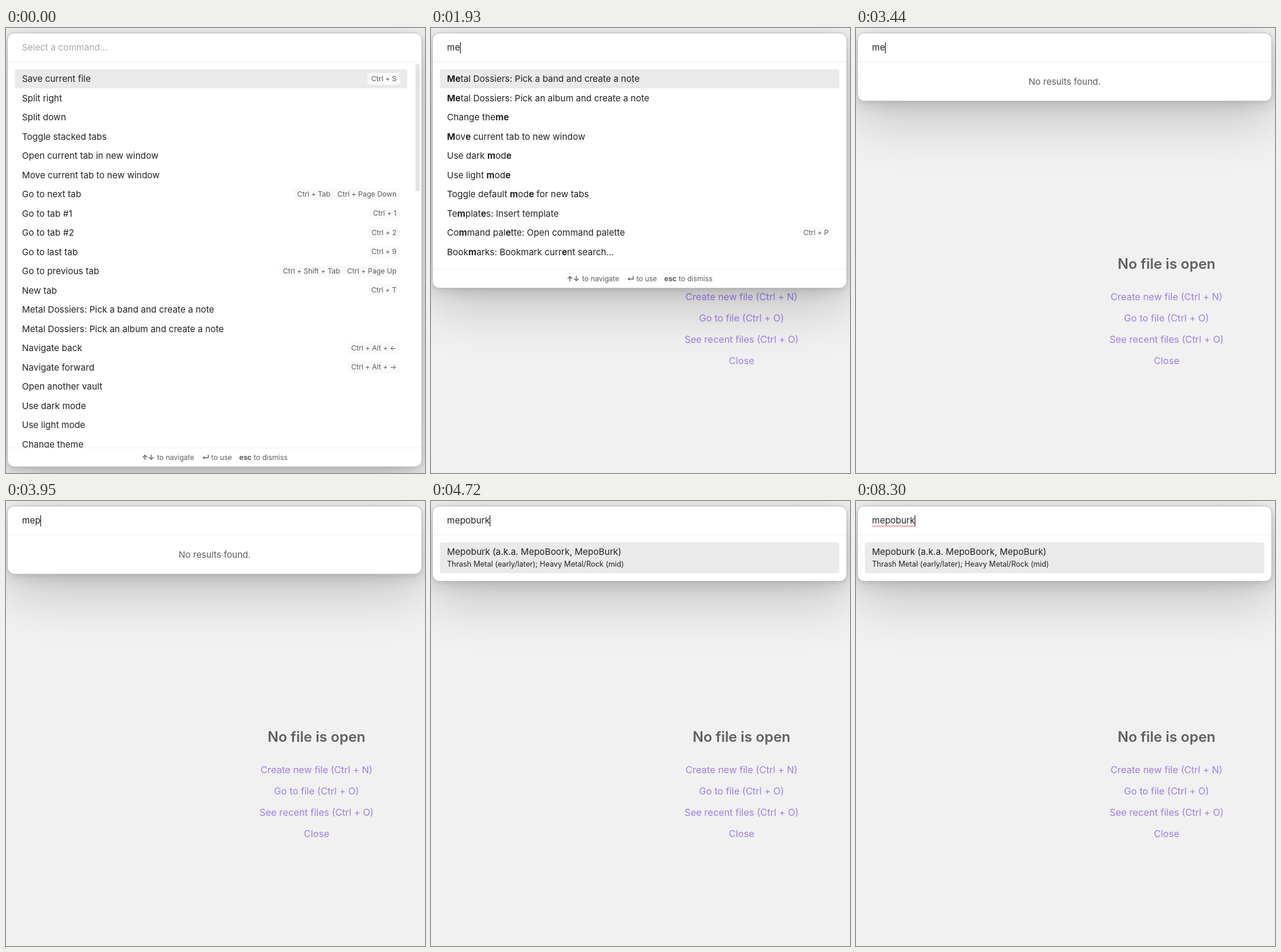
These frames come from a looping animation (707x752 px, 8660 ms). An HTML page:

```html
<!DOCTYPE html>
<html lang="en">
<head>
<meta charset="utf-8">
<title>Command palette</title>
<style>
* { box-sizing: border-box; }
html, body { margin: 0; width: 100%; height: 100%; overflow: hidden; }
body { position: relative; background: #f1f1f1; color: #222; font: 15px/19.5px Inter, sans-serif; }
#empty { position: absolute; left: 374px; top: 384px; width: 300px; text-align: center; color: #9f7ee8; font-size: 16px; line-height: 36px; }
#empty h1 { margin: 0 0 22px; font-size: 24px; font-weight: 600; line-height: 30px; color: #5f5f5f; }
#panel {
  position: absolute; left: 2px; top: 8px; width: 700px; max-height: 734px;
  display: flex; flex-direction: column; overflow: hidden;
  background: #fff; border: 1px solid #bdbdbd; border-radius: 12px;
  box-shadow: 0 1.8px 7.3px rgba(0,0,0,.07), 0 6.3px 24.7px rgba(0,0,0,.11), 0 30px 90px rgba(0,0,0,.2);
}
#input { flex: none; height: 49px; padding-left: 24px; display: flex; align-items: center; border-bottom: 1px solid #f0f0f0; }
#caret { width: 1px; height: 19px; margin: 0 -1px 0 0; background: #000; }
#hint { color: #ababab; }
#wave { position: absolute; left: 24px; top: 32px; width: 72px; height: 3px; fill: none; stroke: #e5303c; }
#results { padding: 12px; overflow: hidden; }
#results.scroll { padding-right: 24px; }
#thumb { position: absolute; left: 688px; top: 52px; width: 7px; border-radius: 3px; background: #e4e4e4; }
.row { display: flex; align-items: center; padding: 6px 12px; margin-bottom: 1px; border-radius: 3px; white-space: nowrap; }
.row:first-child { background: #eaeaea; }
.row > div { flex: 1; }
kbd { margin: -2px 0; padding: 2px 6px; border-radius: 4px; background: #fafafa; color: #5c5c5c; font: 12px/16px Inter, sans-serif; }
.none { height: 41px; line-height: 42px; text-align: center; color: #5c5c5c; }
#footer { position: relative; flex: none; height: 32px; border-top: 1px solid #f0f0f0; font-size: 12px; line-height: 31px; color: #5c5c5c; white-space: nowrap; }
#footer > * { position: absolute; top: 0; }
</style>
</head>
<body>
<div id="empty">
  <h1>No file is open</h1>
  <div>Create new file (Ctrl + N)</div>
  <div>Go to file (Ctrl + O)</div>
  <div>See recent files (Ctrl + O)</div>
  <div>Close</div>
</div>
<div id="panel">
  <div id="input"><span id="query"></span><i id="caret"></i><span id="hint">Select a command...</span></div>
  <svg id="wave"><path/></svg>
  <div id="results"></div>
  <div id="thumb"></div>
  <div id="footer">
    <b style="left:226px">↑↓</b><span style="left:252px">to navigate</span>
    <b style="left:328px">↵</b><span style="left:343.5px">to use</span>
    <b style="left:390.5px">esc</b><span style="left:415px">to dismiss</span>
  </div>
</div>
<script>
const LOOP = 8660;
const el = id => document.getElementById(id);

// Each entry: label | hotkey | hotkey
const commands = `Save current file|Ctrl + S
Split right
Split down
Toggle stacked tabs
Open current tab in new window
Move current tab to new window
Go to next tab|Ctrl + Tab|Ctrl + Page Down
Go to tab #1|Ctrl + 1
Go to tab #2|Ctrl + 2
Go to last tab|Ctrl + 9
Go to previous tab|Ctrl + Shift + Tab|Ctrl + Page Up
New tab|Ctrl + T
Metal Dossiers: Pick a band and create a note
Metal Dossiers: Pick an album and create a note
Navigate back|Ctrl + Alt + ←
Navigate forward|Ctrl + Alt + →
Open another vault
Use dark mode
Use light mode
Change theme`.split('\n');

const searchable = `Move current tab to new window
Metal Dossiers: Pick a band and create a note
Metal Dossiers: Pick an album and create a note
Use dark mode
Use light mode
Toggle default mode for new tabs
Zoom in
Zoom out
Templates: Insert template
Command palette: Open command palette|Ctrl + P
Bookmarks: Show bookmarks
Bookmarks: Bookmark all tabs...
Bookmarks: Bookmark current search...
Reset zoom
Change theme`.split('\n');

// Each entry: band | genre
const bands = `Orlun Mepore (a.k.a. Orlun)|Black Metal
Builders of Mepoten|Experimental Black Metal
Tower of Mepolisks|Raw Black Metal
Trolun Ka Mepos|Black Metal
Brick Mepolirk|Death/Doom Metal
Windy Petal Meposandt|Heavy Metal
Caravans of the Mepodorna (a.k.a. COTM)|Stoner/Thrash Metal/Metalcore
Mepo|Heavy Metal
Mepo Bandro (a.k.a. Mepobandro)|Progressive/Heavy Metal
Mepo Teal Starling (a.k.a. Mepoteal Starling)|Sludge Metal
Mepo Talondus (a.k.a. Talondus)|Heavy Metal
Mepo Loom (a.k.a. Mepoloom)|Thrash/Heavy Metal
Mepo Stove (a.k.a. Mepostove)|Thrash Metal`.split('\n');
const found = ['Mepoburk (a.k.a. MepoBoork, MepoBurk)|Thrash Metal (early/later); Heavy Metal/Rock (mid)'];

// [start, query, view]
const steps = [
  [0, '', 'all'],
  [1770, 'm', 'filter'], [1890, 'me', 'filter'], [2000, 'met', 'filter'],
  [2110, 'meta', 'filter'], [2220, 'metal', 'filter'],
  [2790, '', 'none'], [3290, 'm', 'none'], [3440, 'me', 'none'], [3950, 'mep', 'none'],
  [4070, 'mepo', 'none'], [4130, 'mepo', 'bands'], [4210, 'mepob', 'bands'], [4340, 'mepobu', 'bands'],
  [4410, 'mepobur', 'bands'], [4490, 'mepobur', 'none'],
  [4690, 'mepoburk', 'none'], [4720, 'mepoburk', 'found'],
];
const caretOff = [[0, 130], [730, 1340], [5310, 5890], [6490, 7090], [7700, 8300]];
const SPELLCHECK = 5730;

const commandRow = (label, keys) =>
  `<div class="row"><div>${label}</div>${keys.map(k => `<kbd>${k}</kbd>`).join('')}</div>`;
const bandRow = entry => {
  const [name, genre] = entry.split('|');
  return `<div class="row"><div>${name}<br><small>${genre}</small></div></div>`;
};

// Greedy subsequence match; tighter matches rank first.
function fuzzy(entry, query) {
  const [label, ...keys] = entry.split('|');
  let html = '', n = 0, first = 0, last = 0;
  [...label].forEach((c, i) => {
    const hit = c.toLowerCase() === query[n];
    if (hit) { if (!n++) first = i; last = i; }
    html += hit ? `<b>${c}</b>` : c;
  });
  html = html.replaceAll('</b><b>', '');
  return { ok: n === query.length, span: last - first, html: commandRow(html, keys) };
}

const views = {
  all: () => commands.map(c => { const [label, ...keys] = c.split('|'); return commandRow(label, keys); }),
  filter: q => searchable.map(c => fuzzy(c, q)).filter(m => m.ok).sort((a, b) => a.span - b.span).map(m => m.html),
  none: () => ['<div class="none">No results found.</div>'],
  bands: () => bands.map(bandRow),
  found: () => found.map(bandRow),
};
const thumbHeight = { all: 215, bands: 83 };

function show([, query, view]) {
  const thumb = thumbHeight[view] || 0;
  el('query').textContent = query;
  el('hint').hidden = view !== 'all';
  el('results').innerHTML = views[view](query).join('');
  el('results').className = thumb ? 'scroll' : '';
  el('thumb').style.height = thumb + 'px';
  el('footer').style.display = view === 'all' || view === 'filter' ? '' : 'none';
}

el('wave').firstChild.setAttribute('d', 'M0 .5' + 'l2 2l2 -2'.repeat(18));

let current;
function frame(now) {
  const t = now % LOOP;
  const step = steps.findLast(s => s[0] <= t);
  if (step !== current) show(current = step);
  const hidden = caretOff.some(([from, to]) => t >= from && t < to);
  el('caret').style.opacity = hidden ? 0 : 1;
  el('wave').style.opacity = t >= SPELLCHECK ? 1 : 0;
  requestAnimationFrame(() => frame(performance.now() - start));
}
const start = performance.now();
frame(0);
</script>
</body>
</html>
```
